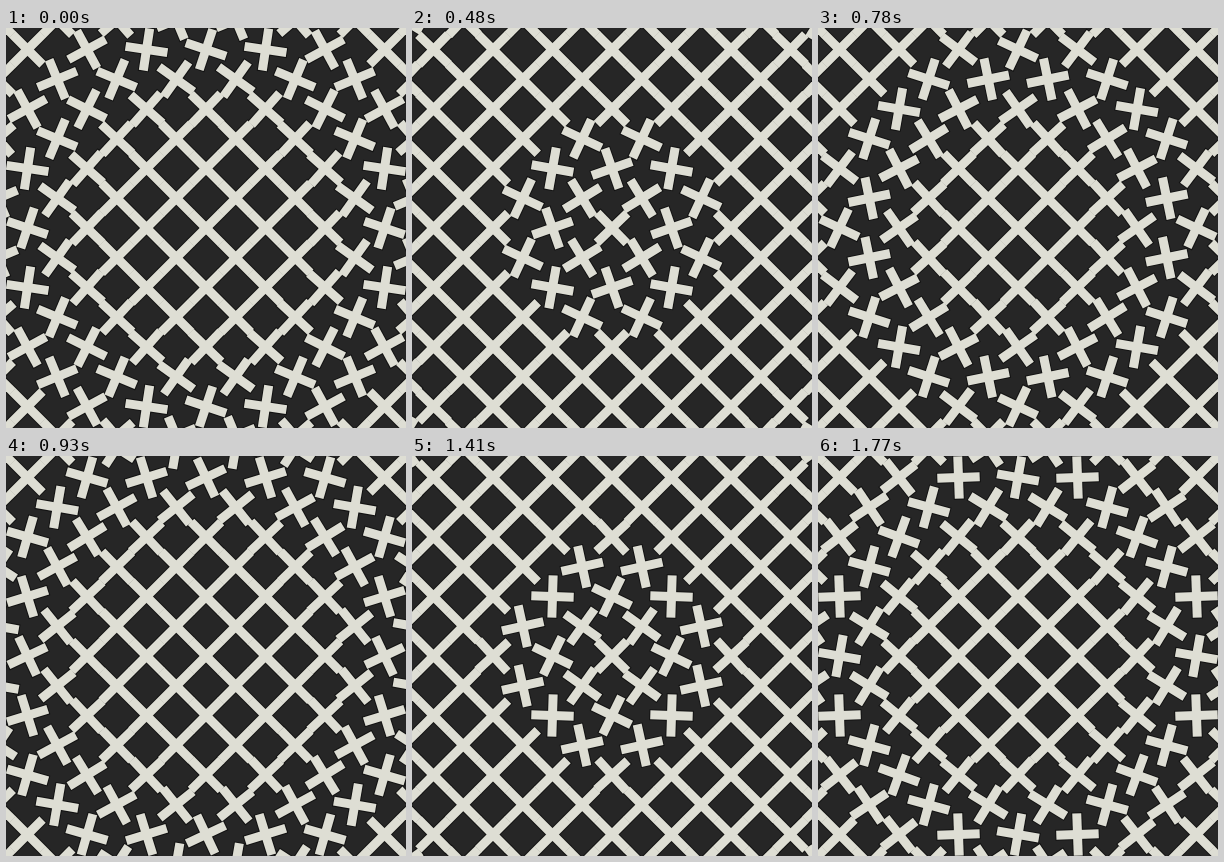
An HTML page with a canvas for the animation above (1.8 s loop, 400 by 400 pixels).

```html
<!DOCTYPE html>
<html>
<head>
<meta charset="utf-8">
<style>
html, body { margin: 0; width: 100%; height: 100%; overflow: hidden; background: #262626; }
canvas { display: block; }
</style>
</head>
<body>
<canvas id="stage" width="400" height="400"></canvas>
<script>
const ctx = document.getElementById('stage').getContext('2d');
const LOOP = 1800, STEP = 30;
const TURN = 480;      // duration of one quarter turn, ms
const FIRST = 65;      // time at which the centre cross starts to turn, ms
const SPEED = 0.281;   // ripple speed, px per ms
const GAP = 29.75, LENGTH = 42.4, WIDTH = 9, EDGE = 1, REACH = 8;

// Same curve as the CSS keyword "ease": cubic-bezier(.25, .1, .25, 1).
function ease(p) {
  if (p <= 0) return 0;
  if (p >= 1) return 1;
  let low = 0, high = 1, s;
  for (let n = 0; n < 20; n++) {
    s = (low + high) / 2;
    if (0.75 * s * (1 - s) + s ** 3 < p) low = s; else high = s;
  }
  return 0.3 * s * (1 - s) ** 2 + 3 * s * s * (1 - s) + s ** 3;
}

// Each loop sends out one counter-clockwise ripple, then a clockwise one.
function angleAt(dist, time) {
  const start = FIRST + dist / SPEED;
  const local = ((time - start) % LOOP + LOOP) % LOOP;
  const turns = ease((local - LOOP / 2) / TURN) - ease(local / TURN);
  return Math.PI / 4 + turns * Math.PI / 2;
}

function cross(x, y, angle, grow) {
  const l = LENGTH + 2 * grow, w = WIDTH + 2 * grow;
  ctx.save();
  ctx.translate(200 + x, 200 + y);
  ctx.rotate(angle);
  ctx.fillRect(-l / 2, -w / 2, l, w);
  ctx.fillRect(-w / 2, -l / 2, w, l);
  ctx.restore();
}

function layer(time, color, grow) {
  ctx.fillStyle = color;
  for (let i = -REACH; i <= REACH; i++) {
    for (let j = -REACH; j <= REACH; j++) {
      if ((i + j) % 2) continue;
      const x = i * GAP, y = j * GAP;
      cross(x, y, angleAt(Math.hypot(x, y), time), grow);
    }
  }
}

function draw(time) {
  ctx.fillStyle = '#262626';
  ctx.fillRect(0, 0, 400, 400);
  layer(time, '#121212', EDGE);
  layer(time, '#deded4', 0);
}

const begin = performance.now();
function tick() {
  const time = (performance.now() - begin) % LOOP;
  draw(Math.floor(time / STEP) * STEP);
  requestAnimationFrame(tick);
}
tick();
</script>
</body>
</html>
```
